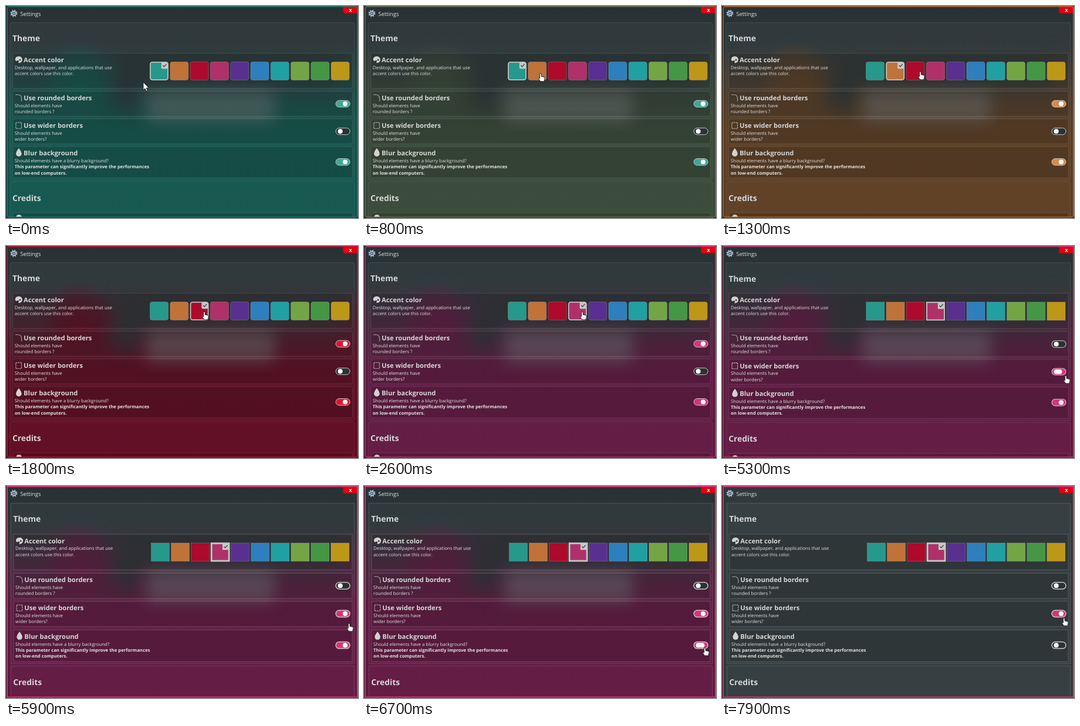
Recreate the animation shown at these times as an HTML page. Size 600 by 362 pixels, loop 8000 ms.

```html
<!DOCTYPE html>
<html lang="en">
<head>
<meta charset="utf-8">
<title>Settings</title>
<style>
@property --deep { syntax: '<color>'; inherits: true; initial-value: #0f554c }
@property --edge { syntax: '<color>'; inherits: true; initial-value: #178074 }
@property --lit { syntax: '<color>'; inherits: true; initial-value: #3aa898 }
@property --wide { syntax: '<number>'; inherits: true; initial-value: 0 }
@property --round { syntax: '<number>'; inherits: true; initial-value: 1 }
@property --blur { syntax: '<number>'; inherits: true; initial-value: 1 }
@property --sel { syntax: '<number>'; inherits: true; initial-value: 0 }
@property --hand { syntax: '<number>'; inherits: true; initial-value: 0 }
@property --l { syntax: '<number>'; inherits: true; initial-value: 0 }
@property --r { syntax: '<number>'; inherits: true; initial-value: 0 }
@property --on { syntax: '<number>'; inherits: true; initial-value: 0 }

html, body { margin: 0; width: 100%; height: 100%; overflow: hidden; background: #151c1d }
svg { display: block; width: 600px; height: 362px }
svg, .toggle, .cursor {
  animation-duration: 8s;
  animation-iteration-count: infinite;
  animation-timing-function: linear;
}
svg {
  animation-name: tint, light, wide, round, blur, sel, hand;
  animation-timing-function: linear, linear, linear, linear, linear, step-end, step-end;
}

text {
  font-family: 'Open Sans', 'Noto Sans', sans-serif;
  font-size: 7.85px;
  fill: #e2e3e2;
  text-rendering: geometricPrecision;
}
.head, .name { font-size: 13.8px; font-weight: 700; fill: #d6d7d6 }
.name { font-size: 11.15px }
.strong { font-size: 7.75px; font-weight: 700 }

.row { transform: translateY(calc(var(--d) * var(--wide) * 1px)) }
.in { transform: translateX(calc(1.3px * var(--wide))) }
.panel, .card {
  rx: calc(3px * var(--round));
  stroke: rgb(255 255 255 / .1);
  stroke-width: calc(1px + .8px * var(--wide));
}
.panel { fill: rgb(255 255 255 / .03); width: calc(587px - 1.3px * var(--wide)) }
.card { fill: rgb(0 0 0 / .14); width: calc(579px - 1.6px * var(--wide)) }

.at { transform: translate(calc(245px + 2px * var(--wide) + var(--i) * (34.3px - .25px * var(--wide))), 95px) }
.at rect { rx: calc(3.5px * var(--round)) }
.dots { stroke: rgb(255 255 255 / .3); stroke-dasharray: 1.5 1 }
.ring { fill: none; stroke: #c6c8c7; stroke-width: calc(1.6px + 1.2px * var(--wide)) }
.at .tab { fill: #c4c8c6; rx: calc(2px * var(--round)) }

.pill { fill: #2a3234 }
.fill { fill: var(--lit); opacity: var(--on) }
.rim { fill: none; stroke: #c6c6c6; stroke-width: calc(1px + .5px * var(--wide)) }
.knob {
  fill: #fff;
  x: calc(565.6px + 8.4px * var(--l));
  width: calc(8.2px + 8.4px * (var(--r) - var(--l)));
}
.icon { fill: none; stroke: #cfd0cf; stroke-width: 1.1 }
.solid { fill: #d2d2d2 }

.frame {
  fill: none;
  stroke: var(--edge);
  stroke-width: calc(1.4px + .6px * var(--wide));
  rx: calc(4px * var(--round));
}
.close { fill: #e2000f; rx: calc(4px * var(--round)) }
.haze { opacity: var(--blur) }
.soft { filter: blur(13px) }
.deep { stop-color: var(--deep) }
.cursor { animation-name: move; animation-timing-function: ease-in-out }
.cursor path { fill: #fff; stroke: #14181a; stroke-width: .9; stroke-linejoin: round }
.arrow { opacity: calc(1 - var(--hand)) }
.hand { opacity: var(--hand) }

@keyframes tint {
  0%, 8.5% { --deep: #0f554c; --edge: #178074 }
  11.5%, 16.5% { --deep: #5c3c20; --edge: #b8682c }
  19.5%, 26.5% { --deep: #5e0820; --edge: #cc1030 }
  29.5%, 100% { --deep: #611640; --edge: #d0306f }
}
@keyframes light {
  0%, 10.3% { --lit: #3aa898 }
  12.3%, 17% { --lit: #d98a4a }
  20%, 27% { --lit: #e5122e }
  30%, 100% { --lit: #d6347a }
}
@keyframes wide { 0%, 65.4% { --wide: 0 } 71%, 100% { --wide: 1 } }
@keyframes round { 0%, 47% { --round: 1 } 49%, 100% { --round: 0 } }
@keyframes blur { 0%, 84.5% { --blur: 1 } 88%, 100% { --blur: 0 } }
@keyframes sel {
  0% { --sel: 0 } 10.6% { --sel: 1 } 16.6% { --sel: 2 } 26.6%, 100% { --sel: 3 }
}
@keyframes hand {
  0%, 35.6%, 57%, 74%, 91% { --hand: 0 }
  2.5%, 42.6%, 60%, 77%, 94%, 100% { --hand: 1 }
}
@keyframes rounded {
  0%, 46.25% { --l: 1; --r: 1; --on: 1 }
  48% { --l: 0; --r: .7; --on: 1 }
  49.5%, 100% { --l: 0; --r: 0; --on: 0 }
}
@keyframes wider {
  0%, 64.5% { --l: 0; --r: 0; --on: 0 }
  66.25% { --l: 0; --r: .7; --on: 1 }
  68.5%, 100% { --l: 1; --r: 1; --on: 1 }
}
@keyframes blurry {
  0%, 82.25% { --l: 1; --r: 1; --on: 1 }
  83.75% { --l: 0; --r: .8; --on: 1 }
  86%, 100% { --l: 0; --r: 0; --on: 0 }
}
@keyframes move {
  0% { transform: translate(234px, 130px) }
  7.5%, 12% { transform: translate(301px, 115px) }
  16%, 23.5% { transform: translate(338px, 112px) }
  26%, 35% { transform: translate(372px, 112px) }
  43.5%, 54% { transform: translate(588px, 170px) }
  63%, 70% { transform: translate(586px, 221px) }
  81%, 88% { transform: translate(581px, 276px) }
  97.5%, 100% { transform: translate(583px, 225px) }
}
</style>
</head>
<body>
<svg viewBox="0 0 600 362">
  <defs>
    <linearGradient id="dusk" x1="0" y1="0" x2="0" y2="1">
      <stop offset="0" stop-color="#1c2628" stop-opacity=".4"/>
      <stop offset=".45" stop-color="#1c2628" stop-opacity="0"/>
    </linearGradient>
    <linearGradient id="fall" x1="0" y1="0" x2="0" y2="1">
      <stop class="deep" offset=".17" stop-opacity="0"/>
      <stop class="deep" offset=".38" stop-opacity=".5"/>
      <stop class="deep" offset=".58" stop-opacity=".92"/>
      <stop class="deep" offset="1"/>
    </linearGradient>
    <radialGradient id="glow">
      <stop class="deep" offset="0" stop-opacity=".75"/>
      <stop class="deep" offset=".5" stop-opacity=".5"/>
      <stop class="deep" offset="1" stop-opacity="0"/>
    </radialGradient>
    <clipPath id="window"><path d="M1 0H600V360.5H1z"/></clipPath>
  </defs>

  <g clip-path="url(#window)">
    <path fill="#30393c" d="M1 0H600V361H1z"/>
    <g class="haze">
      <path fill="url(#dusk)" d="M1 0H600V361H1z"/>
      <path fill="url(#fall)" d="M1 0H600V361H1z"/>
      <ellipse fill="url(#glow)" cx="124" cy="132" rx="66" ry="72"/>
      <g class="soft">
        <rect fill="#2a3335" opacity=".75" x="195" y="78" width="370" height="62"/>
        <ellipse fill="#2a3335" opacity=".7" cx="205" cy="148" rx="24" ry="34"/>
        <rect fill="#727878" opacity=".5" x="240" y="146" width="218" height="52"/>
      </g>
    </g>

    <circle cx="13.4" cy="12.6" r="5" fill="none" stroke="#9db0c0" stroke-width="2.2" stroke-dasharray="2.2 1.73"/>
    <circle cx="13.4" cy="12.6" r="3.5" fill="#34506c" stroke="#b4c3cf" stroke-width="1.7"/>
    <circle cx="13.4" cy="12.6" r="1.2" fill="#dfe6ec"/>
    <text x="24.2" y="16.8" style="font-size:9.5px">Settings</text>

    <g class="row" style="--d:1">
      <g class="in">
        <rect class="panel" x="7" y="28.5" height="269" style="height:calc(269px + 5px*var(--wide))"/>
        <text class="head" x="11" y="60.4">Theme</text>
      </g>
    </g>
    <g id="rows"></g>
    <g class="row" style="--d:7.3">
      <g class="in">
        <rect class="panel" x="7" y="300" height="90"/>
        <text class="head" x="11" y="332.6">Credits</text>
        <rect class="card" x="11.5" y="353" height="40"/>
        <circle class="solid" cx="22" cy="361" r="4.8"/>
      </g>
    </g>
  </g>

  <rect class="close" x="574.5" y="-6" width="32" height="18.4"/>
  <text x="587" y="10.3" text-anchor="middle" style="font-size:9px;font-weight:700;fill:#fff">x</text>
  <rect class="frame" x="2" y="1" width="597" height="359.5"/>

  <g class="cursor">
    <path class="arrow" d="M0 0V13.5L3 10.8 5 15.5 7.3 14.5 5.3 10H9.5Z"/>
    <path class="hand" d="M-1.3 1Q0-.8 1.3 1V5.2L6 6.2Q7.4 6.8 7.2 8.5L6 13.8H-.2L-3.6 9Q-3.4 7.4-1.3 8.6Z"/>
  </g>
</svg>
<script>
const palette = ['#26988c', '#bf7338', '#ad0a2c', '#b03169', '#59308f',
  '#2d7fbe', '#20a0a2', '#74a545', '#459645', '#bd9718'];

const icons = {
  palette: `<path class="solid" d="M21.5 86C17.5 86 15.5 89 15.7 91.5C16 94 18 94.4 19.6 93.2
    C21 92.2 22.4 93.4 21.6 95C20.8 96.8 21.6 97.6 23 97.3C26 96.6 27.9 94.4 27.8 91.2C27.6 88 25 86 21.5 86z"/>
    <circle cx="23.8" cy="92" r="1.5" fill="#394143"/>`,
  corner: '<path class="icon" style="opacity:.75" d="M16 151.5H20Q26.5 151.5 26.5 158V162.5"/>',
  dashed: '<rect class="icon" x="16.8" y="199" width="9.6" height="10.2" stroke-dasharray="2.2 1.1"/>',
  drop: '<path class="solid" d="M21.8 242.8Q26.6 249 26.6 252.2A4.8 4.8 0 0 1 17 252.2Q17 249 21.8 242.8z"/>'
};

const pillBox = (name, y) => `<rect class="${name}" x="562.2" y="${y - 5.7}" width="24" height="11.4" rx="5.7"/>`;

const toggle = (track, y) => `<g class="toggle" style="animation-name:${track}">
  ${['pill', 'fill', 'rim'].map(c => pillBox(c, y)).join('')}
  <rect class="knob" y="${y - 3.9}" height="7.8" rx="3.9"/></g>`;

const swatches = palette.map((c, i) => `<g class="at" style="--i:${i}">
  <rect class="dots" x=".5" y=".5" width="31" height="31" fill="${c}"/></g>`).join('') +
  `<g class="at" style="--i:var(--sel)">
  <rect class="tab" x="19.8" y="1" width="11" height="11.2"/>
  <path d="M22.3 6.4L24.5 8.6 28.6 4.2" fill="none" stroke="#30383a" stroke-width="1.2"/>
  <rect class="ring" x="1" y="1" width="30" height="30"/></g>`;

// Lines starting with * are set in bold.
const row = (top, height, shift, icon, name, lines, control) => {
  const base = top + 15.2;
  const body = lines.map((s, i) => {
    const bold = s[0] === '*';
    return `<text ${bold ? 'class="strong"' : ''} x="14.8" y="${base + 11.8 + i * 10.3}">${bold ? s.slice(1) : s}</text>`;
  }).join('');
  return `<g class="row" style="--d:${shift}"><g class="in">
    <rect class="card" x="11.5" y="${top}" style="height:calc(${height}px + .8px*var(--wide))"/>
    ${icons[icon]}<text class="name" x="30" y="${base}">${name}</text>${body}</g>${control}</g>`;
};

document.getElementById('rows').innerHTML =
  row(80.5, 60, 1.9, 'palette', 'Accent color',
    ['Desktop, wallpaper, and applications that use', 'accent colors use this color.'], swatches) +
  row(145.7, 42.5, 3.2, 'corner', 'Use rounded borders',
    ['Should elements have', 'rounded borders ?'], toggle('rounded', 167)) +
  row(192.8, 42.5, 4, 'dashed', 'Use wider borders',
    ['Should elements have', 'wider borders?'], toggle('wider', 214)) +
  row(240, 53.5, 5.6, 'drop', 'Blur background',
    ['Should elements have a blurry background?',
      '*This parameter can significantly improve the performances',
      '*on low-end computers.'], toggle('blurry', 266.3));
</script>
</body>
</html>
```
